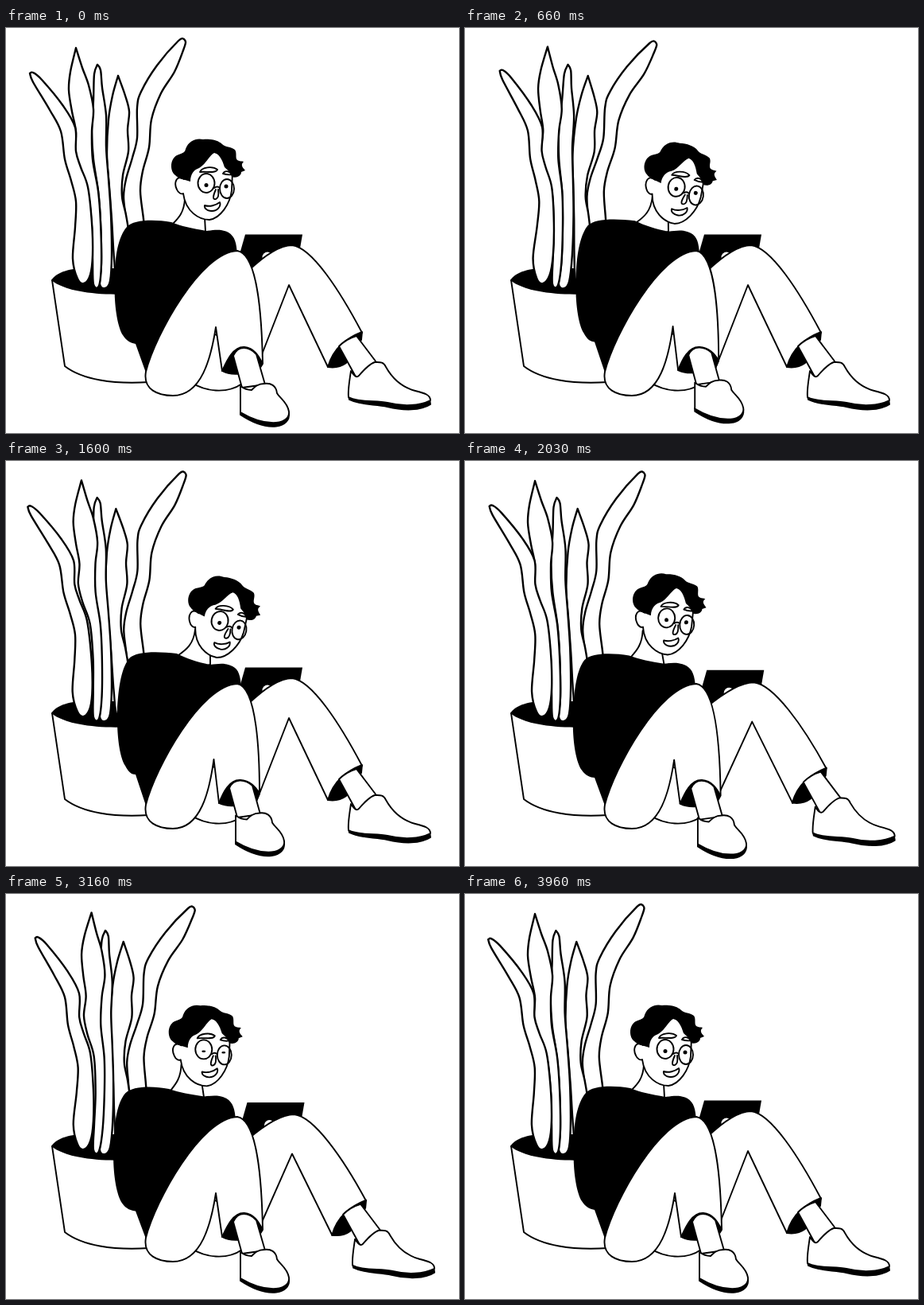
Recreate the animation shown at these times as an HTML page. Size 570 px wide and 509 px high, loop 4000 ms.

```html
<!DOCTYPE html>
<html lang="en">
<head>
<meta charset="utf-8">
<title>Reading by the plant</title>
<style>
html, body { margin: 0; width: 100%; height: 100%; overflow: hidden; background: #fff; }
svg { display: block; width: 100%; height: 100%; }
.line { fill: #fff; stroke: #000; stroke-width: 1.9; stroke-linejoin: round; stroke-linecap: round; }
.open { fill: none; }
.leaf { stroke-width: 2.4; }
</style>
</head>
<body>
<svg viewBox="0 0 570 509">
  <g id="pot">
    <path class="line" stroke-width="2.2" d="M58 317L74 425C96 442 135 448 180 445L200 330Z"/>
    <path d="M57 317C64 306 82 302 100 302L190 302L190 330C150 338 82 337 57 317Z"/>
  </g>
  <g id="leaves"></g>
  <path id="neck" class="line"/>
  <path id="shirt"/>
  <g id="head">
    <path class="line" d="M224 190C214 184 211 195 215 203C217 208 221 209 223 208C226 231 243 241 256 241C270 239 282 221 284 204L285 180L262 150L232 170Z"/>
    <path d="M222 190C218 189 215 187 213 185C206 180 206 165 215 160C222 157 225 157 226 152C230 141 240 138 248 140C257 139 267 141 272 146C276 150 283 149 288 153C291 157 288 163 291 166C294 168 297 167 299 168C294 173 299 176 301 179L296 181C296 186 290 189 284 187C282 180 278 178 275 175C272 165 268 158 262 157C256 160 251 172 243 176C237 178 232 183 232 193Z"/>
    <path class="line" d="M244 181C246 175 260 173 266 178C264 183 252 180 244 181Z"/>
    <path class="line" d="M273 183C275 179 281 179 284 184C280 185 276 184 273 183Z"/>
    <ellipse class="line open" cx="252" cy="195" rx="10.5" ry="12"/>
    <ellipse class="line open" cx="278" cy="202" rx="9" ry="12"/>
    <path class="line" d="M262 201Q266 198 269 201M264 203C260 212 260 216 264 215C267 214 268 210 267 203"/>
    <ellipse id="eyeL" cx="252" cy="197.500" rx="2.500"/>
    <ellipse id="eyeR" cx="277" cy="199" rx="2.500"/>
    <path id="mouth" class="line"/>
  </g>
  <g id="laptop">
    <path d="M301 259.500L373 259.500L366 300L314 330L292 291Z"/>
    <circle cx="329" cy="288" r="6.500" fill="#fff"/>
  </g>
  <path class="line" d="M225 440C250 460 280 459 297 447L300 400L250 380Z"/>
  <path id="backLeg" class="line"/>
  <g id="backFoot">
    <path class="line" d="M405 426C412 402 428 390 448 382L447 392L428 421C420 427 412 427 405 426Z" style="fill:#000"/>
    <path class="line" d="M419 400C426 393 434 389 441 387L466 420L441 440Z"/>
    <path class="line" style="fill:#000" d="M431 462L432 467C448 475 465 472 480 476C500 481 522 481 534 473L533 466Z"/>
    <path class="line" d="M434 431C432 445 430 455 431 464C445 471 465 468 480 471C500 476 520 475 534 468C534 461 527 459 515 456C500 452 487 442 478 426C475 419 470 420 464 420C457 422 450 430 444 437C441 440 438 437 434 431Z"/>
  </g>
  <path id="frontLeg" class="line"/>
  <path id="hem" class="line" style="fill:#000"/>
  <path id="ankle" class="line"/>
  <g id="frontShoe">
    <path class="line" style="fill:#000" d="M295 482L295 486C310 496 325 502 340 500.500C351 499 357 493 356 484Z"/>
    <path class="line" d="M295 450L295 483C310 492 325 497 340 496C352 495 357 488 356 482C354 470 345 466 341 459C340 449 333 446 325 447C317 447 313 451 309 455C303 455 299 453 295 450Z"/>
  </g>
</svg>
<script>
const LOOP = 4000, SWAY = 2000;
const $ = id => document.getElementById(id);
const clamp = x => Math.min(1, Math.max(0, x));
const ramp = (t, from, to) => clamp((t - from) / (to - from));
const smooth = x => x * x * (3 - 2 * x);
const easeOut = x => 1 - (1 - x) ** 3;

// Blend each number of a path towards other paths of the same structure.
const numbers = path => path.match(/-?[\d.]+/g).map(Number);
function blend(base, ...targets) {
  const from = numbers(base);
  const ends = targets.map(([path, weight]) => [numbers(path), weight]);
  let i = 0;
  return base.replace(/-?[\d.]+/g, () => {
    const v = ends.reduce((sum, [to, w]) => sum + (to[i] - from[i]) * w, from[i]);
    i++;
    return v.toFixed(2);
  });
}

// Smooth curve through a list of points.
function spline(text) {
  const n = numbers(text), pts = [];
  for (let i = 0; i < n.length; i += 2) pts.push([n[i], n[i + 1]]);
  const at = i => pts[Math.min(pts.length - 1, Math.max(0, i))];
  let d = `M${at(0)}`;
  for (let i = 0; i < pts.length - 1; i++) {
    const [a, b, c, e] = [at(i - 1), at(i), at(i + 1), at(i + 2)];
    d += `C${b.map((v, k) => v + (c[k] - a[k]) / 6)} ${c.map((v, k) => v - (e[k] - b[k]) / 6)} ${c}`;
  }
  return d + 'Z';
}

// Back to front: pivot x, tip y, swing in px, delay in ms.
const leaves = [
  { x: 165, top: 14, swing: 9, delay: 320, points: '224,14 217,16 190,47 170,80 165,100 165,138 159,163 151,190 148,212 151,240 155,280 160,320 175,320 176,270 173,240 169,205 172,180 180,150 183,115 195,82 212,55 223,28 226,18 224,14' },
  { x: 146, top: 60, swing: 8.5, delay: 215, points: '141,60 134,85 129,115 127,160 130,200 133,240 136,290 140,320 155,320 155,265 151,235 146,212 147,185 154,155 153,128 155,105 150,85 141,60' },
  { x: 122, top: 46, swing: 8.5, delay: 290, points: '115,46 111,58 110,90 108,130 110,165 116,205 119,245 120,295 118,322 125,327 131,318 133,285 132,235 129,190 126,150 126,110 121,75 119,53 115,46' },
  { x: 122, top: 25, swing: 10.5, delay: 490, points: '88,25 81,55 79,78 83,105 88,130 87,155 93,178 103,205 108,250 109,290 110,322 117,324 120,295 119,245 116,205 109,165 108,130 110,102 104,72 96,50 88,25' },
  { x: 97, top: 56, swing: 8.5, delay: 215, points: '30,57 34,68 55,103 69,130 74,165 82,192 88,218 87,250 84,290 90,315 98,321 106,310 109,285 108,245 103,200 94,175 88,155 87,125 72,98 45,65 34,56 30,57' }
];
for (const leaf of leaves) {
  leaf.el = document.createElementNS('http://www.w3.org/2000/svg', 'path');
  leaf.el.setAttribute('class', 'line leaf');
  leaf.el.setAttribute('d', spline(leaf.points));
  $('leaves').append(leaf.el);
}

const neck = {
  rest: 'M225 215C224 232 217 239 210 246L230 262L251 256L250 238',
  lean: 'M238 212C236 230 227 237 217 244L235 262L257 256L257 244',
  recoil: 'M216 214C216 232 209 240 204 248L225 262L247 255L243 239'
};
const shirt = {
  rest: 'M208 244C185 240 160 241 152 250C138 266 137 300 137 310C135 345 140 375 147 386C152 394 158 396 163 397L177 436L220 400L300 300L291 285C290 270 288 262 280 257C270 252 262 254 252 255C235 252 220 249 208 244Z',
  lean: 'M215 242C190 239 164 239 155 248C142 264 141 300 140 310C139 345 143 372 150 383C154 391 158 394 163 394L177 436L220 400L300 300L296 285C295 270 293 262 285 258C275 253 267 255 257 256C241 253 227 248 215 242Z',
  recoil: 'M202 246C182 242 158 242 148 251C136 266 135 300 134 315C132 350 137 380 145 391C150 398 158 400 163 400L177 436L220 400L300 300L287 285C286 270 283 262 275 257C265 252 257 253 247 254C230 252 215 250 202 246Z'
};
const mouth = {
  smile: 'M250 223C256 225 264 223 269 219C271 224 266 230 259 230C254 230 249 227 250 223Z',
  gasp: 'M252 226C252 222 256 222 258 222C265 222 265 231 258 231C253 231 252 229 252 226Z'
};
const backLeg = {
  rest: 'M304 306C325 286 345 273 360 273C385 276 420 330 448 383L405 426L356 323L315 428Z',
  out: 'M304 311C329 292 350 281 365 281C390 283 429 335 458 388L416 432L364 330L315 428Z'
};
const frontLeg = {
  rest: 'M176 432C188 385 245 282 291 280C318 284 322 370 323 421L272 431L264 376C258 415 246 462 210 462C192 462 172 455 176 432Z',
  tucked: 'M176 432C188 385 245 282 291 280C316 284 319 370 319 417L268 430L261.500 375C256 415 245 462 210 462C192 462 172 455 176 432Z'
};
const hem = {
  rest: 'M272 431C278 418 286 400 300 401C312 402 318 412 323 422L318 430C300 434 285 438 272 431Z',
  tucked: 'M268 430C273 417 281 400 295 401C307 402 314 409 319 418L315 427C296 433 281 436 268 430Z'
};
const ankle = {
  rest: 'M286 412C292 398 306 400 315 410L326 448L297 452Z',
  tucked: 'M281 411C287 398 301 400 310 408L320 444L291 448Z'
};

const blinks = [310, 1110, 1770];
const setPath = (id, d) => $(id).setAttribute('d', d);
const move = (id, x, y, more = '') => $(id).setAttribute('transform', `translate(${x} ${y})${more}`);

function draw(t) {
  for (const { el, x, top, swing, delay } of leaves) {
    const wave = ms => Math.sin((ms - delay) / SWAY * 2 * Math.PI);
    const angle = swing * (wave(t) - wave(0)) / (320 - top) * 180 / Math.PI;
    el.setAttribute('transform', `rotate(${angle} ${x} 320)`);
  }

  const back = smooth(ramp(t, 1620, 2300));
  const lean = smooth(ramp(t, 0, 900)) * (1 - back);
  const tuck = easeOut(ramp(t, 0, 1000)) * (1 - back);
  const recoil = back * (1 - smooth(ramp(t, 2660, 3660)));

  for (const [id, pose] of Object.entries({ neck, shirt }))
    setPath(id, blend(pose.rest, [pose.lean, lean], [pose.recoil, recoil]));
  move('head', 8.5 * lean - 6.5 * recoil, 4 * lean + 0.7 * recoil, `rotate(${10 * lean} 245 245)`);
  setPath('mouth', blend(mouth.smile, [mouth.gasp, smooth(ramp(recoil, 0.6, 0.9))]));

  const open = Math.min(...blinks.map(b => ramp(Math.abs(t % SWAY - b), 20, 120)));
  for (const id of ['eyeL', 'eyeR']) $(id).setAttribute('ry', 0.7 + 1.8 * open);

  move('laptop', 5 * recoil, 5 * recoil);
  setPath('backLeg', blend(backLeg.rest, [backLeg.out, recoil]));
  move('backFoot', 10.3 * recoil, 5.5 * recoil);

  for (const [id, pose] of Object.entries({ frontLeg, hem, ankle }))
    setPath(id, blend(pose.rest, [pose.tucked, tuck]));
  move('frontShoe', -6 * tuck, -4.5 * tuck);
}

const start = performance.now();
function tick() {
  draw((performance.now() - start) % LOOP);
  requestAnimationFrame(tick);
}
tick();
</script>
</body>
</html>
```
